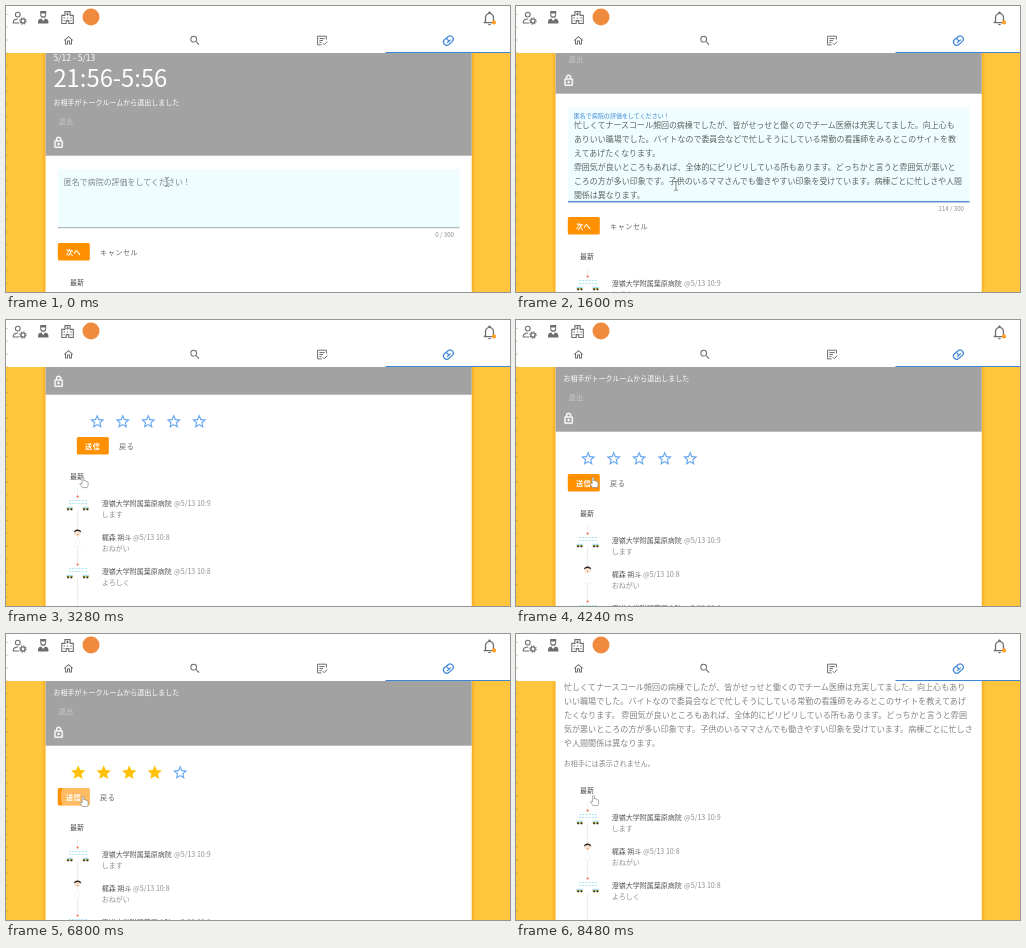
Animation of 504 by 286 pixels, one loop 8560 ms. Source, as an HTML page:

```html
<!DOCTYPE html>
<html lang="ja">
<head>
<meta charset="utf-8">
<title>病院の評価</title>
<style>
  html, body { margin: 0; width: 100%; height: 100%; overflow: hidden; background: #fff; }
  svg { display: block; width: 504px; height: 286px; }
  text { font-family: "Noto Sans CJK JP", "Noto Sans CJK", "Noto Sans", sans-serif; white-space: pre; }
</style>
</head>
<body>
<svg id="stage" viewBox="0 0 504 286" xmlns="http://www.w3.org/2000/svg"></svg>
<script>
const LOOP = 8560, STEP = 80;
const PASTE = 960, NEXT = 3080, SENT = 7200;
const BLUE = '#3f86d6', ORANGE = '#ff9100', ICON_GREY = '#6e6e6e';

const HOSPITAL = '澄嶺大学附属葉原病院', PERSON = '梶森 朔斗';
const LABEL = '匿名で病院の評価をしてください！';
const REVIEW = [
  '忙しくてナースコール頻回の病棟でしたが、皆がせっせと働くのでチーム医療は充実してました。向上心も',
  'ありいい職場でした。バイトなので委員会などで忙しそうにしている常勤の看護師をみるとこのサイトを教',
  'えてあげたくなります。',
  '雰囲気が良いところもあれば、全体的にピリピリしている所もあります。どっちかと言うと雰囲気が悪いと',
  'ころの方が多い印象です。子供のいるママさんでも働きやすい印象を受けています。病棟ごとに忙しさや人間',
  '関係は異なります。'
];
// The posted review is the same text, wrapped at a wider measure.
const POSTED = (() => {
  const all = REVIEW.slice(0, 3).join('') + ' ' + REVIEW.slice(3).join('');
  const cuts = [0, 50, 100, 151, 202, all.length];
  return cuts.slice(1).map((end, i) => all.slice(cuts[i], end));
})();

const ICON = {
  home: 'M12 5.69L17 10.19V18H15V12H9V18H7V10.19L12 5.69M12 3L2 12H5V20H11V14H13V20H19V12H22L12 3Z',
  search: 'M9.5,3A6.5,6.5 0 0,1 16,9.5C16,11.11 15.41,12.59 14.44,13.73L14.71,14H15.5L20.5,19L19,20.5L14,15.5V14.71L13.73,14.44C12.59,15.41 11.11,16 9.5,16A6.5,6.5 0 0,1 3,9.5A6.5,6.5 0 0,1 9.5,3M9.5,5C7,5 5,7 5,9.5C5,12 7,14 9.5,14C12,14 14,12 14,9.5C14,7 12,5 9.5,5Z',
  bell: 'M10 21H14C14 22.1 13.1 23 12 23S10 22.1 10 21M21 19V20H3V19L5 17V11C5 7.9 7 5.2 10 4.3V4C10 2.9 10.9 2 12 2S14 2.9 14 4V4.3C17 5.2 19 7.9 19 11V17L21 19M17 11C17 8.2 14.8 6 12 6S7 8.2 7 11V18H17V11Z',
  lock: 'M12,17C10.89,17 10,16.1 10,15C10,13.89 10.89,13 12,13A2,2 0 0,1 14,15A2,2 0 0,1 12,17M18,20V10H6V20H18M18,8A2,2 0 0,1 20,10V20A2,2 0 0,1 18,22H6C4.89,22 4,21.1 4,20V10C4,8.89 4.89,8 6,8H7V6A5,5 0 0,1 12,1A5,5 0 0,1 17,6V8H18M12,3A3,3 0 0,0 9,6V8H15V6A3,3 0 0,0 12,3Z',
  star: 'M12 17.27L18.18 21L16.54 13.97L22 9.24L14.81 8.63L12 2L9.19 8.63L2 9.24L7.45 13.97L5.82 21Z',
  starHole: 'M12,15.39L8.24,17.66L9.23,13.38L5.91,10.5L10.29,10.13L12,6.09L13.71,10.13L18.09,10.5L14.77,13.38L15.76,17.66Z'
};

const at = (x, y, s, body) => `<g transform="translate(${x} ${y}) scale(${s}) translate(-12 -12)">${body}</g>`;
const icon = (x, y, s, name, fill, more = '') =>
  at(x, y, s, `<path d="${ICON[name]}" fill="${fill}" fill-rule="evenodd" ${more}/>`);
const baseline = (cy, size) => cy + size * .37;
const txt = (x, cy, size, str, fill, more = '') =>
  `<text x="${x}" y="${baseline(cy, size)}" font-size="${size}" fill="${fill}" ${more}>${str}</text>`;
const rect = (x, y, w, h, fill, more = '') =>
  `<rect x="${x}" y="${y}" width="${w}" height="${h}" fill="${fill}" ${more}/>`;
const line = (d, more = '') => `<path d="${d}" fill="none" ${more}/>`;

function buttons(cy, main, other, id) {
  return `${rect(51.8, cy - 9, 32, 17.6, ORANGE, 'rx="1.6"')}
    <clipPath id="${id}Clip">${rect(51.8, cy - 9, 32, 17.6, '#000', 'rx="1.6"')}</clipPath>
    <g clip-path="url(#${id}Clip)"><circle id="${id}Ripple" fill="#fff" cx="77" cy="${cy}" r="0"/></g>
    ${txt(60, cy, 7.1, main, '#fff', 'font-weight="700" letter-spacing=".5"')}
    ${txt(94, cy, 7.1, other, '#666', 'letter-spacing=".55"')}`;
}

function hospitalArt(y) {
  const car = x => rect(x, y + 3.2, 6.4, 2, '#a5e3f0', 'rx=".8"') +
    rect(x, y + 4.8, 6.4, 1.2, '#f3cf3a') +
    `<circle cx="${x + 1.6}" cy="${y + 5.8}" r="1.1" fill="#333"/><circle cx="${x + 4.9}" cy="${y + 5.8}" r="1.1" fill="#333"/>`;
  return rect(63, y - 5, 18, 12, '#fff') +
    line(`M63 ${y - 3}H82M63 ${y}H82`, 'stroke="#a3e4f1" stroke-width=".9" stroke-dasharray="2 1.2"') +
    `<circle cx="71.6" cy="${y - 7}" r="1.1" fill="#ee6a48"/>` + car(60.5) + car(76.5);
}

function personArt(y) {
  return `<path d="M71.6 ${y + 4}L68.5 ${y + 14}H74.7Z" fill="#fff" stroke="#f0f0f0" stroke-width=".6"/>
    <circle cx="71.6" cy="${y}" r="3.4" fill="#fbe3d2"/>
    <path d="M67.8 ${y}A3.9 4 0 0 1 75.4 ${y}Q71.6 ${y - 3} 67.8 ${y}Z" fill="#2a2828"/>
    <circle cx="71.6" cy="${y + 2}" r=".6" fill="#e8763c"/>`;
}

// Feed rows, measured from the middle of the heading.
function feed() {
  const rows = [[HOSPITAL, 168, '10:9', 'します'], [PERSON, 127, '10:8', 'おねがい'], [HOSPITAL, 168, '10:8', 'よろしく']];
  return txt(64, 0, 7, '最新', '#444') +
    line('M71.6 12V130', 'stroke="#e6e6e6" stroke-width=".8"') +
    rows.map(([name, x, time, note], i) => {
      const y = 27.5 + 34 * i;
      return (i === 1 ? personArt(y - 5) : hospitalArt(y)) +
        txt(95.7, y, 7.02, name, '#555') +
        txt(x, y, 7.1, '@5/13 ' + time, '#8f8f8f') +
        txt(95.7, y + 11, 7.02, note, '#8f8f8f');
    }).join('');
}

const starX = i => 72.2 + 25.5 * i;
const stars = [0, 1, 2, 3, 4].map(i => at(starX(i), 176.5, .72, `<path class="star" fill-rule="evenodd"/>`)).join('');

const topBar = rect(0, 0, 504, 47, '#fff') +
  `<g stroke="${ICON_GREY}" stroke-width="1.1" fill="none">
    <circle cx="11.8" cy="8.6" r="2.4"/><path d="M13 17H7.3V15.6Q8 13.2 12 13"/>
    <circle cx="17" cy="15" r="2.1" stroke-width="1.4"/><circle cx="17" cy="15" r="3.2" stroke-dasharray="1.2 1.31"/>
    <path d="M55.8 17.5V9.4H58.9V5.6H64.1V9.4H67.3V17.5H62.8V14.6H60.2V17.5Z"/>
    <path d="M61.5 6.8V9.6M60.1 8.2H62.9M57.5 12H59M60.8 12H62.3M64.2 12H65.7M57.5 14.8H58.7M64.4 14.8H65.7"/>
  </g>
  <path d="M34.2 5H40.2V8.4A3 3.4 0 0 1 34.2 8.4ZM32 17.6V15.2Q32.4 13 35.2 12.6L37.2 15L39.2 12.6Q42 13 42.4 15.2V17.6Z" fill="${ICON_GREY}"/>
  <path d="M35.2 7.5H39.2V8.6A2 2 0 0 1 35.2 8.6Z" fill="#fff"/>
  <circle cx="85" cy="11" r="8.5" fill="#f08a3c"/>` +
  icon(483.5, 12, .66, 'bell', ICON_GREY) + '<circle cx="488" cy="16.4" r="2.1" fill="#ff9f24"/>' +
  icon(62.5, 34.5, .5, 'home', ICON_GREY) + icon(189, 34.5, .52, 'search', ICON_GREY) +
  `<g fill="none" stroke="${ICON_GREY}"><path d="M320.4 33.5V30.2H311.6V38.9H315.6M313.4 32.6H318.6M313.4 34.6H317M313.4 36.6H315.4"/>
    <path d="M316.8 37.2L318.3 38.7L321.2 35.6"/></g>
  <g transform="translate(442.4 34.6) rotate(-40)" fill="none" stroke="${BLUE}" stroke-width="1.2">
    <rect x="-5.4" y="-3.2" width="10.8" height="6.4" rx="3.2"/><path d="M-2.6 .8H2.4M0 -3V.8"/></g>` +
  rect(379.5, 46, 124.5, 1, BLUE);

const header = rect(39, 0, 427, 149.7, '#a2a2a2') +
  txt(47.5, 52, 8.5, '5/12 - 5/13', '#fff') +
  txt(47.4, 72, 23.8, '21:56-5:56', '#fff') +
  txt(47.5, 96.5, 7.02, 'お相手がトークルームから退出しました', '#fff', 'font-weight="500"') +
  txt(52.5, 115, 7.1, '退出', '#c9c9c9', 'letter-spacing=".4"') +
  icon(52.6, 136.5, .52, 'lock', '#fff', 'stroke="#fff" stroke-width=".7"');

const writeForm = `<rect id="box" x="52" y="163" width="401.5" height="59" fill="#f0fdff"/>
  <text id="label" x="57.8">${LABEL}</text>
  <g id="review">${REVIEW.map((s, i) => txt(57.9, 181 + 14 * i, 7.97, s, '#5c6364')).join('')}</g>
  <g id="below">
    ${rect(52, 221.3, 401.5, .9, '#9aa2a4')}
    <rect id="focus" y="221.2" height="1.1" fill="${BLUE}"/>
    <text id="count" x="448" y="231.3" font-size="6.1" fill="#8a8a8a" text-anchor="end"></text>
    ${buttons(246, '次へ', 'キャンセル', 'next')}
  </g>`;

const cursors = `<g id="cursor">
  <path class="ibeam" d="M-2 -4.5Q0 -4.5 0 -3.4Q0 -4.5 2 -4.5M0 -3.4V3.4M-2 4.5Q0 4.5 0 3.4Q0 4.5 2 4.5" fill="none" stroke="#666" stroke-width=".8"/>
  <path class="arrow" d="M0 0V8.6L2 6.8L3.5 10L4.8 9.4L3.4 6.3H6Z" fill="#fff" stroke="#999" stroke-width=".7"/>
  <path class="hand" d="M-.9 .8Q0 -.6 .9 .8V4L1.3 3.4Q2.3 3.1 2.5 4.2Q3.6 3.6 3.9 4.8Q5 4.5 5.1 5.6V8Q5 9.6 4.3 10.6H-.4L-3.2 6.8Q-3.2 5.4 -.9 6.8Z" fill="#fff" stroke="#888" stroke-width=".7" stroke-linejoin="round"/>
</g>`;

const stage = document.getElementById('stage');
stage.innerHTML = `<defs>
    <clipPath id="card">${rect(39.6, 47, 426.1, 239, '#000')}</clipPath>
    <linearGradient id="shade"><stop offset="0" stop-color="#f5a61a" stop-opacity="0"/><stop offset="1" stop-color="#f5a61a" stop-opacity=".75"/></linearGradient>
  </defs>
  ${rect(0, 0, 504, 286, '#ffc63d')}
  ${rect(35.6, 47, 4, 239, 'url(#shade)')}
  <g transform="translate(505.3 0) scale(-1 1)">${rect(35.6, 47, 4, 239, 'url(#shade)')}</g>
  ${rect(39.6, 47, 426.1, 239, '#fff')}
  <g clip-path="url(#card)">
    <g id="page">${header}
      <g id="write">${writeForm}</g>
      <g id="rate">${stars}${buttons(201, '送信', '戻る', 'send')}</g>
    </g>
    <g id="posted">
      ${POSTED.map((s, i) => txt(47.9, 53 + 14 * i, 8.07, s, '#828282')).join('')}
      ${txt(47.7, 129.5, 7.02, 'お相手には表示されません。', '#858585')}
    </g>
    <g id="feed">${feed()}</g>
  </g>
  ${topBar}
  ${line('M1 8V286', 'stroke="#77756a" stroke-opacity=".4" stroke-width="2" stroke-dasharray=".8 12"')}
  ${cursors}`;

const el = Object.fromEntries([...stage.querySelectorAll('[id]')].map(n => [n.id, n]));
const starEls = stage.querySelectorAll('.star');
const cursorEls = ['ibeam', 'arrow', 'hand'].map(c => stage.querySelector('.' + c));

const set = (node, attrs) => { for (const k in attrs) node.setAttribute(k, attrs[k]); };
const show = (node, on) => { node.style.display = on ? '' : 'none'; };
const move = (node, x, y) => set(node, { transform: `translate(${x} ${y})` });
const clamp = v => Math.max(0, Math.min(1, v));
const span = (t, from, to) => clamp((t - from) / (to - from));
const mix = (a, b, p) => a + (b - a) * p;

// Value of a [time, ...values] table at time t.
function follow(table, t) {
  const i = table.findIndex(row => row[0] > t);
  if (i < 0) return table[table.length - 1].slice(1);
  if (i === 0) return table[0].slice(1);
  const a = table[i - 1], b = table[i];
  const p = (t - a[0]) / (b[0] - a[0]);
  return a.slice(1).map((v, k) => mix(v, b[k + 1], p));
}

const SCROLL = [[1280, 0], [1600, 62], [1920, 122], [NEXT - 1, 122], [NEXT, 75], [3600, 75], [4000, 38]];
const POINTER = [
  [480, 161, 176], [1200, 160, 180], [1680, 160, 180], [1920, 148.5, 179.5], [2240, 148.5, 179.5],
  [2720, 77, 157], [4320, 77, 157], [4640, 74, 137], [5120, 149, 137], [5440, 149, 137],
  [6240, 77, 162], [SENT, 77, 162], [SENT + 80, 77.5, 161]
];

function ripple(node, t, start) {
  const age = t - start;
  set(node, { r: age < 0 ? 0 : Math.min(40, age * .22), opacity: .38 * (1 - span(age, 300, 500)) });
}

function draw(t) {
  const [scroll] = follow(SCROLL, t);
  const [px, py] = follow(POINTER, t);
  const writing = t < NEXT, sent = t >= SENT, pasted = t >= PASTE;
  const grow = pasted ? 36 : 0;

  move(el.page, 0, -scroll);
  show(el.page, !sent);
  show(el.posted, sent);
  show(el.write, writing);
  show(el.rate, !writing);
  move(el.feed, 0, sent ? 156 : (writing ? 276 + grow : 231) - scroll);

  const focus = span(t, 480, 720);
  const size = mix(7.97, 6.03, focus);
  set(el.label, { 'font-size': size, y: baseline(mix(176, 172, focus), size), fill: focus ? BLUE : '#7c8689' });
  set(el.box, { height: 59 + grow });
  set(el.focus, { x: mix(252.75, 52, focus), width: 401.5 * focus });
  show(el.review, pasted);
  move(el.below, 0, grow);
  el.count.textContent = (pasted ? 214 : 0) + ' / 300';
  ripple(el.nextRipple, t, 2900);

  move(el.rate, 426 * (1 - span(t, NEXT, NEXT + 310)) ** 3, 0);
  const hovered = t < 4560 ? 0 : Math.floor((px - 64) / 25.5) + 1;
  const lit = t >= 5120 ? 4 : Math.min(4, hovered);
  starEls.forEach((s, i) => set(s, i < lit
    ? { d: ICON.star, fill: '#ffc107' }
    : { d: ICON.star + ICON.starHole, fill: '#6aa9f2' }));
  ripple(el.sendRipple, t, 6700);

  move(el.cursor, px, py);
  const kind = t < 1680 ? 0 : t < 2640 ? 1 : 2;
  cursorEls.forEach((c, i) => show(c, i === kind));
}

const begin = performance.now();
function tick() {
  const t = (performance.now() - begin) % LOOP;
  draw(Math.floor(t / STEP) * STEP);
  requestAnimationFrame(tick);
}
tick();
</script>
</body>
</html>
```
